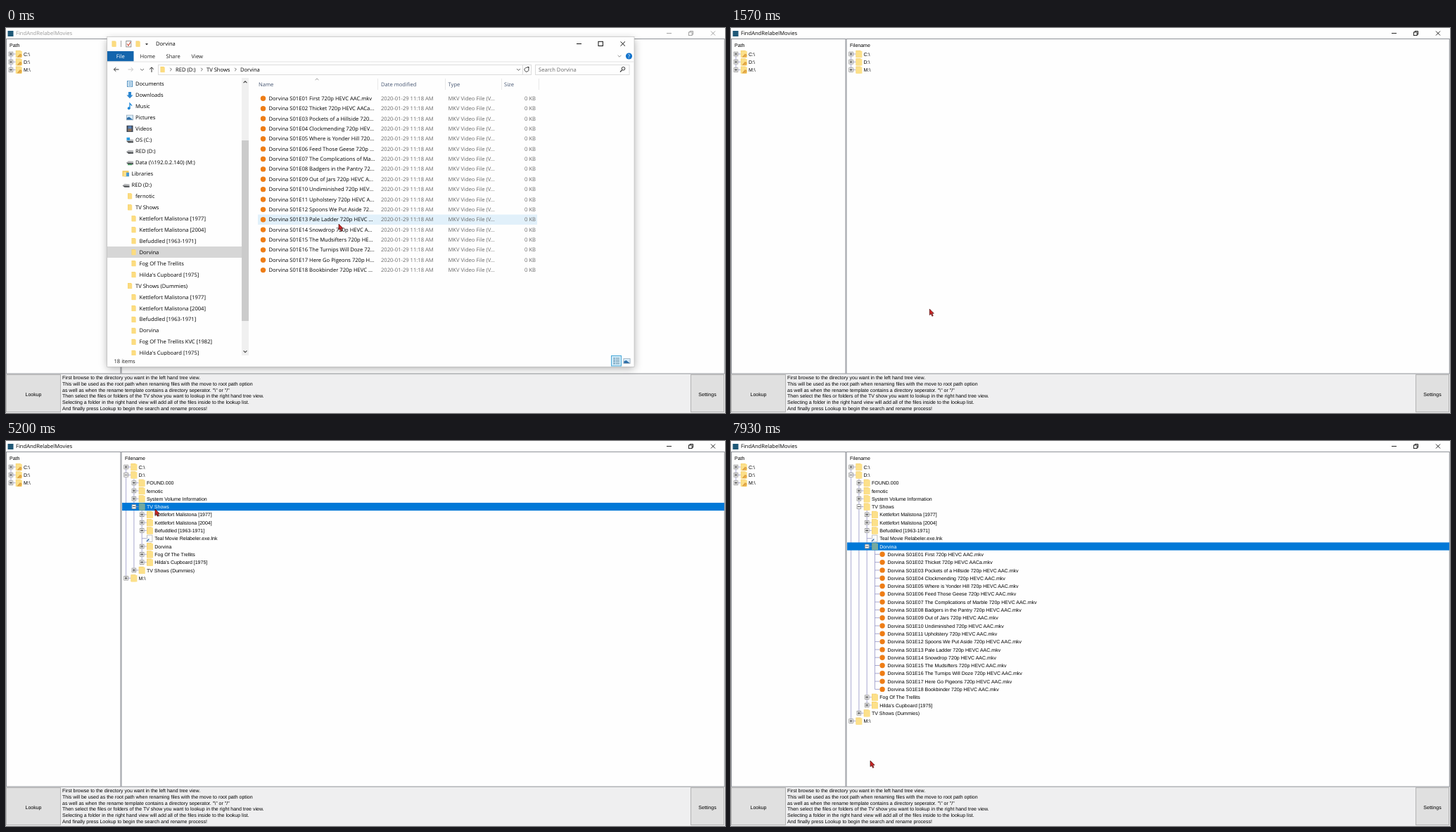
Animation of 1022 by 548 pixels, one loop 8 s. Source, as an HTML page with a canvas:

```html
<!DOCTYPE html>
<html lang="en">
<head>
<meta charset="utf-8">
<title>File tree demo</title>
<style>
html, body { margin: 0; width: 100%; height: 100%; overflow: hidden; background: #fefefe; }
canvas { display: block; width: 1022px; height: 548px; }
</style>
</head>
<body>
<canvas id="stage" width="1022" height="548"></canvas>
<script>
const g = document.getElementById('stage').getContext('2d');
g.textRendering = 'geometricPrecision';
const LOOP = 8000;
const UI = '7.6px "Open Sans", "Noto Sans", sans-serif';
const FORM = '7.03px "Liberation Sans", Arial, sans-serif';
const BLUE = '#0078d7', INK = '#000', GREY = '#686868';
const SHOW = 'Dorvina';
const TITLE = 'FindAndRelabelMovies';

const titles = ['First', 'Thicket', 'Pockets of a Hillside', 'Clockmending', 'Where is Yonder Hill',
  'Feed Those Geese', 'The Complications of Marble', 'Badgers in the Pantry', 'Out of Jars',
  'Undiminished', 'Upholstery', 'Spoons We Put Aside', 'Pale Ladder', 'Snowdrop',
  'The Mudsifters', 'The Turnips Will Doze', 'Here Go Pigeons', 'Bookbinder'];
const files = titles.map((s, i) =>
  `${SHOW} S01E${String(i + 1).padStart(2, '0')} ${s} 720p HEVC AAC${i === 1 ? 'a' : ''}.mkv`);
const KETTLE = ['Kettlefort Malistona [1977]', 'Kettlefort Malistona [2004]'];
const BEF = 'Befuddled [1963-1971]', FOG = 'Fog Of The Trellits', HILDA = "Hilda's Cupboard [1975]";

const dir = (name, kids = [], opens = Infinity, picked = Infinity, dropped = Infinity) =>
  ({ name, kids, opens, picked, dropped, kind: 'dir' });
const leaf = (name, kind) => ({ name, kind, kids: [], opens: Infinity, picked: Infinity, dropped: Infinity });

// opens / picked / dropped: when a node unfolds, gains and loses the selection
const tree = [
  dir('C:\\'),
  dir('D:\\', [
    dir('FOUND.000'), dir('fernotic'), dir('System Volume Information'),
    dir('TV Shows', [
      dir(KETTLE[0]), dir(KETTLE[1]), dir(BEF),
      leaf('Teal Movie Relabeler.exe.lnk', 'link'),
      dir(SHOW, files.map(f => leaf(f, 'video')), 6630, 6300),
      dir(FOG), dir(HILDA)
    ], 4530, 4200, 6300),
    dir('TV Shows (Dummies)')
  ], 2830, 2530, 4200),
  dir('M:\\')
];
const roots = ['C:\\', 'D:\\', 'M:\\'].map(s => dir(s));

// [time, x, y] of the pointer tip
const path = [
  [30, 473, 279], [800, 330, 560], [1270, 330, 560], [2070, 180, 57], [2130, 180, 57],
  [2230, 189, 52], [2530, 189, 52], [3070, 188, 49], [3570, 188, 49], [3930, 213, 95.5],
  [4200, 213, 95.5], [4330, 212, 97], [5200, 212, 97], [5730, 217, 151], [5870, 217, 151],
  [5900, 217, 149], [6630, 217, 149], [6900, 587, 308], [7200, 587, 308], [7930, 198, 455]
];

function pointerAt(t) {
  const i = path.findIndex(p => p[0] > t);
  if (i === 0) return path[0].slice(1);
  if (i < 0) return path[path.length - 1].slice(1);
  const [t0, x0, y0] = path[i - 1], [t1, x1, y1] = path[i];
  const u = (t - t0) / (t1 - t0), e = u * u * (3 - 2 * u);
  return [x0 + (x1 - x0) * e, y0 + (y1 - y0) * e];
}

function rect(x, y, w, h, fill) { g.fillStyle = fill; g.fillRect(x, y, w, h); }
function frame(x, y, w, h, color, lw = 1) { g.strokeStyle = color; g.lineWidth = lw; g.strokeRect(x, y, w, h); }
function line(color, lw, ...p) {
  g.strokeStyle = color; g.lineWidth = lw;
  g.beginPath();
  for (let i = 0; i < p.length; i += 2) g.lineTo(p[i], p[i + 1]);
  g.stroke();
}
function poly(fill, ...p) {
  g.fillStyle = fill;
  g.beginPath();
  for (let i = 0; i < p.length; i += 2) g.lineTo(p[i], p[i + 1]);
  g.fill();
}
function disc(x, y, r, fill) { g.fillStyle = fill; g.beginPath(); g.arc(x, y, r, 0, 7); g.fill(); }
function text(s, x, y, font = UI, color = INK, align = 'left') {
  g.font = font; g.fillStyle = color; g.textAlign = align;
  g.fillText(s, x, y + 2.6);
}
function clip(s, max) {
  g.font = UI;
  if (g.measureText(s).width <= max) return s;
  while (g.measureText(s + '...').width > max) s = s.slice(0, -1);
  return s + '...';
}
function chevron(x, y, dx, dy, color = '#555', lw = 0.9) {
  if (dx) line(color, lw, x - dx, y - 2.2, x + dx, y, x - dx, y + 2.2);
  else line(color, lw, x - 2.4, y - dy, x, y + dy, x + 2.4, y - dy);
}

const icons = {
  folder(x, y) {
    rect(x - 3, y - 4, 5.2, 8, '#f5d26a');
    rect(x - 2.4, y - 3.2, 5.6, 7.4, '#fcdc80');
  },
  doc(x, y) {
    rect(x - 4, y - 4.5, 8, 9, '#4f8fc0');
    rect(x - 3, y - 3.7, 6, 7.4, '#eef6fc');
    for (let i = -2; i <= 2; i += 2) rect(x - 2, y + i - 0.4, 4.4, 0.9, '#5a9ccc');
  },
  down(x, y) {
    poly('#2d86d0', x - 2, y - 4.5, x + 2, y - 4.5, x + 2, y, x + 4.5, y, x, y + 4.7, x - 4.5, y, x - 2, y);
  },
  music(x, y) {
    disc(x - 1.3, y + 2.8, 1.9, '#1e88d8');
    line('#1e88d8', 1.3, x, y + 3, x, y - 4.3, x + 3, y - 0.8);
  },
  picture(x, y) {
    rect(x - 5, y - 3.7, 10, 7.5, '#8fa3b3');
    rect(x - 4.2, y - 3, 8.4, 6, '#d6ebf9');
    poly('#2f6fa8', x - 4.2, y + 3, x - 4.2, y + 0.5, x - 1, y - 1, x + 4.2, y + 3);
  },
  film(x, y) {
    rect(x - 4.5, y - 4.6, 9, 9.2, '#39404c');
    rect(x - 2.6, y - 3.8, 5.2, 7.6, '#5a83b8');
    rect(x - 2.6, y, 5.2, 3.8, '#8a6f58');
  },
  drive(x, y) {
    poly('#b7b9bb', x - 5, y + 1, x - 2, y - 1.6, x + 5, y - 1, x + 5, y + 1.5);
    poly('#4a4d50', x - 5, y + 1, x + 5, y + 1.4, x + 5, y + 3.4, x - 2, y + 3.6);
  },
  system(x, y) { icons.drive(x, y + 0.5); rect(x - 4.5, y - 3.5, 4.5, 4, '#2a9be0'); },
  share(x, y) { icons.drive(x, y - 0.5); rect(x - 3, y + 2.4, 6, 1.5, '#4aa564'); },
  library(x, y) {
    rect(x - 5, y - 4, 9, 8, '#f2c85a');
    rect(x - 2, y - 1.5, 6.5, 5.5, '#4a9ad4');
    rect(x - 3.5, y - 2.5, 4, 6.5, '#fbe08e');
  },
  video(x, y) { disc(x, y, 3.7, '#ee7d16'); },
  link(x, y) {
    rect(x - 3.5, y - 5, 8, 10, '#a9a9a9');
    rect(x - 2.8, y - 4.3, 6.6, 8.6, '#fbfbfb');
    rect(x - 4.5, y, 5, 5, '#dfe9f3');
    line('#24589c', 1.1, x - 3.8, y + 4.2, x - 0.6, y + 1);
  }
};

function treeFolder(x, y, chosen, marked) {
  rect(x - 4.5, y - 5, 7, 10, chosen ? '#5f9a97' : '#f5d06c');
  rect(x - 3.8, y - 4.2, 8.3, 9.4, chosen ? '#75a9a0' : '#fce08a');
  if (marked) {
    poly('#e9b04c', x - 2.5, y + 4.8, x + 1.5, y - 0.6, x + 4.5, y + 1.2, x + 3.5, y + 4.8);
    line('#c98a3a', 0.7, x - 2, y + 4, x + 3, y + 0.6);
  }
}

function drawTree(nodes, left, t, right, marked) {
  const step = 11.3, wire = '#9494c6';
  const rows = [], wires = [];
  let y = 37;
  const walk = (list, depth, from) => {
    const x = left + depth * step;
    let last = y;
    for (const n of list) {
      last = y;
      rows.push({ n, x, y });
      y += step;
      if (t >= n.opens) walk(n.kids, depth + 1, last + 5.5);
    }
    wires.push([x, from, x, last]);
  };
  walk(nodes, 0, y);
  for (const w of wires) line(wire, 0.8, ...w);
  for (const { n, x, y } of rows) {
    const chosen = t >= n.picked && t < n.dropped;
    if (chosen) rect(left - 5.5, y - 5.6, right - left + 5.5, 11.2, BLUE);
    line(wire, 0.8, x, y, x + 6.5, y);
    if (n.kind === 'dir') {
      treeFolder(x + 11.3, y, chosen, marked);
      rect(x - 3, y - 3, 6, 6, '#fff');
      frame(x - 2.8, y - 2.8, 5.6, 5.6, '#8b8b8b', 0.8);
      line('#333', 0.9, x - 1.9, y, x + 1.9, y);
      if (t < n.opens) line('#333', 0.9, x, y - 1.9, x, y + 1.9);
    } else icons[n.kind](x + 10.6, y);
    text(n.name, x + 18, y, FORM, chosen ? '#fff' : INK);
  }
}

function button(label, x, w) {
  rect(x, 493.5, w, 53, '#e0e0e0');
  frame(x + 0.5, 493.5, w - 1, 53, '#b4b4b4');
  text(label, x + w / 2, 521, FORM, INK, 'center');
}

const help = [
  'First browse to the directory you want in the left hand tree view.',
  'This will be used as the root path when renaming files with the move to root path option',
  'as well as when the rename template contains a directory seperator. "\\" or "/"',
  'Then select the files or folders of the TV show you want to lookup in the right hand tree view.',
  'Selecting a folder in the right hand view will add all of the files inside to the lookup list.',
  'And finally press Lookup to begin the search and rename process!'
];

function drawMain(t, active) {
  const c = active ? '#111' : '#999';
  rect(0, 0, 1022, 548, '#fefefe');
  rect(2.5, 4, 8, 8, '#1f5877');
  text(TITLE, 14, 7.8, UI, active ? INK : '#989898');
  line(c, 0.9, 939, 7.5, 946, 7.5);
  frame(970.5, 6, 4.6, 4.6, c, 0.9);
  line(c, 0.9, 972, 6, 972, 4.5, 976.6, 4.5, 976.6, 9.2, 975, 9.2);
  line(c, 0.9, 1002, 4.5, 1008, 10.5);
  line(c, 0.9, 1008, 4.5, 1002, 10.5);

  rect(0, 492, 1022, 56, '#efeff0');
  frame(0.5, 15.5, 162.5, 476.5, '#8e9197');
  frame(164, 15.5, 857.3, 476.5, '#8e9197');
  text('Path', 5, 24, FORM);
  text('Filename', 169, 24, FORM);
  drawTree(roots, 7, 0, 162, true);
  drawTree(tree, 170.6, t, 1021, false);
  button('Lookup', 0, 78);
  button('Settings', 973, 48);
  help.forEach((s, i) => text(s, 80, 497.6 + i * 8.68, FORM));
}

// [label, icon, indent]
const nav = [
  ['Documents', 'doc', 1], ['Downloads', 'down', 1], ['Music', 'music', 1], ['Pictures', 'picture', 1],
  ['Videos', 'film', 1], ['OS (C:)', 'system', 1], ['RED (D:)', 'drive', 1],
  ['Data (\\\\192.0.2.140) (M:)', 'share', 1], ['Libraries', 'library', 0], ['RED (D:)', 'drive', 0],
  ['fernotic', 'folder', 1], ['TV Shows', 'folder', 1],
  ...[...KETTLE, BEF, SHOW, FOG, HILDA].map(s => [s, 'folder', 2]),
  ['TV Shows (Dummies)', 'folder', 1],
  ...[...KETTLE, BEF, SHOW, FOG + ' KVC [1982]', HILDA].map(s => [s, 'folder', 2])
];

function drawNav() {
  g.save();
  g.beginPath(); g.rect(144, 70, 202, 396); g.clip();
  rect(144, 311, 191, 16, '#d6d6d6');
  nav.forEach(([label, icon, indent], i) => {
    const y = 79.5 + i * 15.97, x = 178.5 + indent * 5.5;
    icons[icon](x - 8, y);
    text(label, x, y);
  });
  rect(335, 71, 10, 395, '#f0f0f0');
  rect(335, 160, 10, 257, '#cbcbcb');
  chevron(340, 77, 0, -1.2, '#444', 1.1);
  chevron(340, 460.5, 0, 1.2, '#444', 1.1);
  g.restore();
}

function drawList(px, py) {
  const head = '#465672';
  [['Name', 359], ['Date modified', 533], ['Type', 628.5], ['Size', 708]].forEach(([s, x]) => text(s, x, 80, UI, head));
  for (const x of [528.5, 624.5, 704.5, 757.5]) line('#e9e9e9', 1, x, 72, x, 88);
  chevron(442, 73, 0, -1, '#888', 0.8);
  const pitch = 14.37;
  const hover = px > 358 && px < 755 ? Math.floor((py - 93) / pitch) : -1;
  files.forEach((f, i) => {
    const y = 100.3 + i * pitch;
    if (i === hover) rect(358, y - 7.2, 397, pitch, '#e1f0fa');
    icons.video(365.5, y);
    text(clip(f, 151.5), 373.5, y);
    text('2020-01-29 11:18 AM', 533, y, UI, GREY);
    text('MKV Video File (V...', 628.5, y, UI, GREY);
    text('0 KB', 753, y, UI, GREY, 'right');
  });
}

function drawExplorer(px, py) {
  g.save();
  g.shadowColor = 'rgba(0,0,0,.32)'; g.shadowBlur = 11; g.shadowOffsetY = 3;
  rect(144, 12.5, 749, 469.5, '#fefefe');
  g.restore();
  frame(143.7, 12.3, 749.3, 470, '#b8b8b8', 0.6);

  icons.folder(153.5, 22.5);
  line('#888', 0.8, 163.5, 18, 163.5, 27);
  frame(170.8, 18.5, 7, 8.4, '#777', 0.8);
  line('#d0503c', 1.2, 172, 22.5, 174, 25, 177, 20);
  icons.folder(187.5, 22.5);
  poly('#333', 198, 22, 202, 22, 200, 24.5);
  text(SHOW, 213, 22.5);
  line('#111', 1, 811, 22.5, 818, 22.5);
  frame(842, 19.3, 6.4, 6.2, '#111', 1);
  line('#111', 1, 873.5, 19.3, 880, 25.7);
  line('#111', 1, 880, 19.3, 873.5, 25.7);

  rect(144, 33, 37.5, 14.5, '#1365ad');
  text('File', 162.7, 40.3, UI, '#fff', 'center');
  [['Home', 190.5], ['Share', 227.5], ['View', 263.5]].forEach(([s, x]) => text(s, x, 40.3, UI, '#222'));
  line('#e2e2e2', 1, 144, 48, 892.5, 48);
  chevron(872, 40, 0, 1.2, '#888');
  disc(885.5, 40, 4.6, '#1273cc');
  text('?', 885.5, 40.2, UI, '#fff', 'center');

  line('#333', 1, 160.5, 59, 153.5, 59);
  line('#333', 1, 156.3, 56.2, 153.3, 59, 156.3, 61.8);
  line('#c4c4c4', 1, 173.5, 59, 180.5, 59);
  line('#c4c4c4', 1, 177.7, 56.2, 180.7, 59, 177.7, 61.8);
  chevron(193.5, 59.3, 0, 1.1);
  line('#333', 1, 207, 63, 207, 56);
  line('#333', 1, 204.2, 58.8, 207, 55.8, 209.8, 58.8);
  frame(216.5, 52.5, 530, 14, '#dcdcdc');
  icons.folder(222.5, 59);
  for (const x of [234.3, 278.3, 326.3]) chevron(x, 59, 1.1, 0);
  [['RED (D:)', 241], ['TV Shows', 285], [SHOW, 333]].forEach(([s, x]) => text(s, x, 59));
  chevron(728.5, 59.3, 0, 1.2);
  line('#dcdcdc', 1, 734.5, 53, 734.5, 66);
  g.strokeStyle = '#444'; g.lineWidth = 1;
  g.beginPath(); g.arc(740, 59.3, 3, -0.5, 5); g.stroke();
  poly('#444', 740.5, 55, 743.5, 55, 743.5, 58.5);
  frame(752.5, 52.5, 133.5, 14, '#dcdcdc');
  text('Search ' + SHOW, 757, 59, UI, GREY);
  g.strokeStyle = '#333';
  g.beginPath(); g.arc(877.5, 57.8, 2.3, 0, 7); g.stroke();
  line('#333', 1.2, 875.8, 59.6, 873, 62.5);

  drawNav();
  drawList(px, py);

  text('18 items', 153.5, 474, UI, '#222');
  rect(860.5, 466.5, 14, 14.5, '#cfeaf8');
  frame(860.5, 466.5, 14, 14.5, '#4aa9d8');
  for (let i = 0; i < 4; i++) {
    rect(863.5, 469.5 + i * 2.5, 2, 1.3, '#45789c');
    rect(866.5, 469.5 + i * 2.5, 5.5, 1.3, '#7fa3b8');
  }
  icons.picture(882.5, 474);
}

function drawPointer(x, y) {
  g.save();
  g.translate(x, y);
  g.beginPath();
  [[0, 0], [0, 8.6], [2, 6.9], [3.6, 10.3], [5, 9.6], [3.5, 6.4], [6.1, 6.2]].forEach(p => g.lineTo(...p));
  g.closePath();
  g.fillStyle = '#cc2424'; g.fill();
  g.strokeStyle = '#4a1616'; g.lineWidth = 0.7; g.stroke();
  g.restore();
}

const start = performance.now();
function tick() {
  const t = (performance.now() - start) % LOOP;
  const [x, y] = pointerAt(t);
  const active = t >= 1270;
  drawMain(t, active);
  if (!active) drawExplorer(x, y);
  drawPointer(x, y);
  requestAnimationFrame(tick);
}
tick();
</script>
</body>
</html>
```
